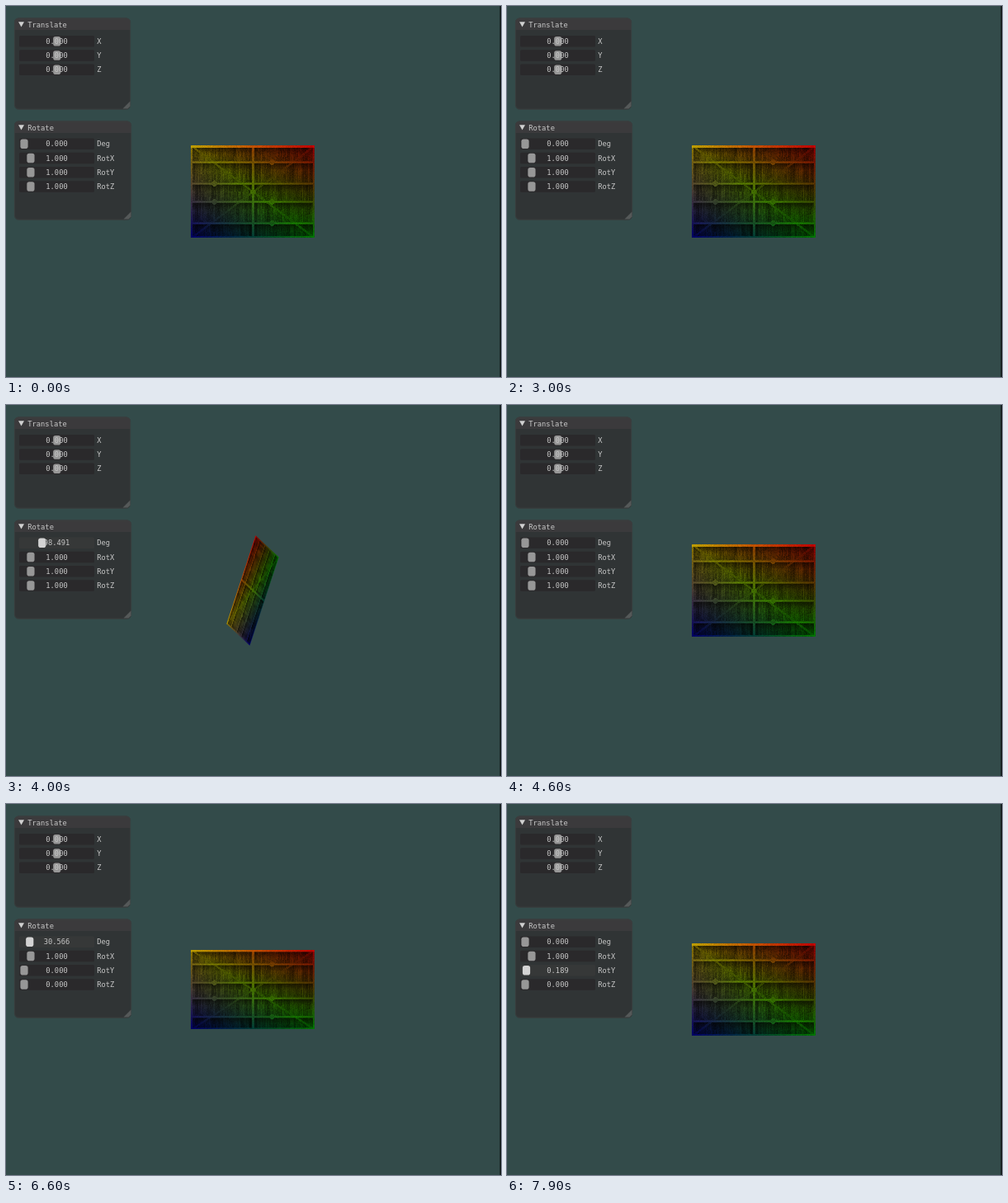
Recreate the animation shown at these times as an HTML page with a canvas. Size 600 by 450 pixels, loop 8 s.

```html
<!DOCTYPE html>
<html lang="en">
<head>
<meta charset="utf-8">
<title>Transform sliders</title>
<style>
  html, body { margin: 0; width: 100%; height: 100%; overflow: hidden; background: #334b4a; }
  canvas { display: block; }
</style>
</head>
<body>
<canvas id="stage" width="600" height="450"></canvas>
<script>
const ctx = document.getElementById('stage').getContext('2d');
const LOOP = 8000, STEP = 100, TRACK = 106;
const TEX_W = 150, TEX_H = 112;

// Slider positions in track units, one per step of the drag
const drags = [
  { row: 'Deg', start: 3500, end: 4400, path: [2, 15, 18, 24, 28, 29, 16, 0] },
  { row: 'RotY', start: 5300, end: 5600, path: [10.6, 4, 0] },
  { row: 'RotZ', start: 5800, end: 6100, path: [10.6, 0] },
  { row: 'Deg', start: 6500, end: 7300, path: [2, 9, 22, 38, 51, 58, 30, 0] },
  { row: 'RotY', start: 7900, end: 8000, path: [2] }
];

function stateAt(time) {
  const state = { Deg: 0, RotX: 1, RotY: 1, RotZ: 1, active: null };
  state.hover = time >= 1500 && time < 1600 ? 'RotX' : null;
  for (const { row, start, end, path } of drags) {
    if (time < start) continue;
    const i = Math.min(Math.floor((time - start) / STEP), path.length - 1);
    state[row] = path[i] / TRACK * (row === 'Deg' ? 360 : 10);
    if (time < end) state.active = row;
  }
  return state;
}

const hash = n => { const s = Math.sin(n * 127.1) * 43758.5453; return s - Math.floor(s); };

// Brightness of the wooden wall: weathered planks, beams, braces and frame
function wood(x, y) {
  const beams = [0, 19, 45, 67, 93];
  const row = beams.findLastIndex(b => b <= y);
  const below = y - beams[row];
  const grain = 0.1 * hash(x * 13 + y * 57);
  let light = 0.13 + 0.1 * hash(Math.floor(x / 5) + row * 40)
    + 0.16 * hash(x + 2) * hash(x * 7 + Math.floor(y / 7) * 31) + grain;
  light *= 0.45 + 0.65 * Math.min(1, below / 11);
  if (row === 4) light *= 0.8;
  if (Math.abs(x - 75) < 5) light *= 0.7;
  const diagonal = x * TEX_H / TEX_W;
  if (Math.min(Math.abs(y - diagonal), Math.abs(TEX_H - y - diagonal)) < 1.5) light = 0.29 + grain;
  if (below < 3) light = (below === 1 ? 0.48 : 0.35) + grain;
  if (Math.abs(x - 75) < 2) light = 0.43 + grain;
  for (const [cx, cy] of [[28, 46], [28, 68], [98, 20], [98, 68], [98, 94], [75, 56]])
    if (Math.hypot(x - cx, y - cy) < 3.2) light = 0.4 + grain;
  if (Math.min(x, TEX_W - 1 - x, TEX_H - 1 - y) < 2) light = 0.42 + grain;
  if (y < 3) light = 0.6 + grain;
  return light;
}

function makeTexture() {
  const canvas = document.createElement('canvas');
  canvas.width = TEX_W;
  canvas.height = TEX_H;
  const g = canvas.getContext('2d');
  const image = g.createImageData(TEX_W, TEX_H);
  for (let y = 0, i = 0; y < TEX_H; y++) {
    for (let x = 0; x < TEX_W; x++) {
      const u = x / (TEX_W - 1), v = y / (TEX_H - 1), light = wood(x, y) * 255;
      image.data[i++] = light * (1 - v) * 1.15;
      image.data[i++] = light * (1 - Math.abs(u - v)) * 0.95;
      image.data[i++] = light * Math.max(0, v - u) * 0.85;
      image.data[i++] = 255;
    }
  }
  g.putImageData(image, 0, 0);
  return canvas;
}
const texture = makeTexture();

function drawQuad({ Deg, RotX, RotY, RotZ }) {
  const length = Math.hypot(RotX, RotY, RotZ) || 1;
  const x = RotX / length, y = RotY / length, z = RotZ / length;
  const angle = Deg * Math.PI / 180, c = Math.cos(angle), s = Math.sin(angle), k = 1 - c;
  ctx.save();
  // Rotation happens in normalised coordinates, hence the 4:3 factors
  ctx.setTransform(x * x * k + c, -(x * y * k + z * s) * 0.75,
    -(x * y * k - z * s) * 4 / 3, y * y * k + c, 299, 225);
  ctx.imageSmoothingQuality = 'high';
  ctx.drawImage(texture, -75, -56, TEX_W, TEX_H);
  ctx.restore();
}

function box(x, y, w, h, radius, color) {
  ctx.fillStyle = color;
  ctx.beginPath();
  ctx.roundRect(x, y, w, h, radius);
  ctx.fill();
}

function triangle(color, ...points) {
  ctx.fillStyle = color;
  ctx.beginPath();
  for (const [x, y] of points) ctx.lineTo(x, y);
  ctx.fill();
}

function label(text, x, y, align = 'left') {
  ctx.fillStyle = '#c8c8c8';
  ctx.textAlign = align;
  ctx.fillText(text, x, y + 3.2);
}

function drawPanel(title, y, w, h) {
  box(10, y, w, h, 5.5, '#303435');
  box(10, y, w, 14.5, [5.5, 5.5, 0, 0], '#3b3a3c');
  ctx.strokeStyle = '#3b4041';
  ctx.lineWidth = 0.8;
  ctx.beginPath();
  ctx.roundRect(10.4, y + 0.4, w - 0.8, h - 0.8, 5);
  ctx.stroke();
  triangle('#d0d0d0', [15, y + 4.7], [22, y + 4.7], [18.5, y + 11]);
  const right = 9.5 + w, bottom = y + h - 1;
  triangle('#555959', [right - 9, bottom], [right, bottom - 9], [right, bottom - 3], [right - 3, bottom]);
  label(title, 26.3, y + 8);
}

function drawSlider(name, y, value, fraction, active, hover) {
  box(16, y - 6.7, 91, 13.4, 1.5, active ? '#363838' : hover ? '#232124' : '#2a292b');
  box(17.4 + fraction * 79.5, y - 5.8, 9.2, 11.6, 2.8, active ? '#d3d3d3' : '#979797');
  label(value.toFixed(3), 61.5, y, 'center');
  label(name, 110.2, y);
}

function draw(time) {
  const state = stateAt(time);
  ctx.fillStyle = '#334b4a';
  ctx.fillRect(0, 0, 600, 450);
  ctx.fillStyle = '#0c1212';
  ctx.fillRect(598.6, 0, 1.4, 450);
  drawQuad(state);
  ctx.font = '8.75px "DejaVu Sans Mono", monospace';
  drawPanel('Translate', 14.5, 141, 111);
  ['X', 'Y', 'Z'].forEach((name, i) => drawSlider(name, 42.7 + i * 17.25, 0, 0.5));
  drawPanel('Rotate', 139.5, 142, 120);
  ['Deg', 'RotX', 'RotY', 'RotZ'].forEach((name, i) =>
    drawSlider(name, 167.2 + i * 17.25, state[name], state[name] / (i ? 10 : 360),
      state.active === name, state.hover === name));
}

function tick() {
  draw(Math.floor(performance.now() % LOOP / STEP) * STEP);
  requestAnimationFrame(tick);
}
tick();
</script>
</body>
</html>
```
